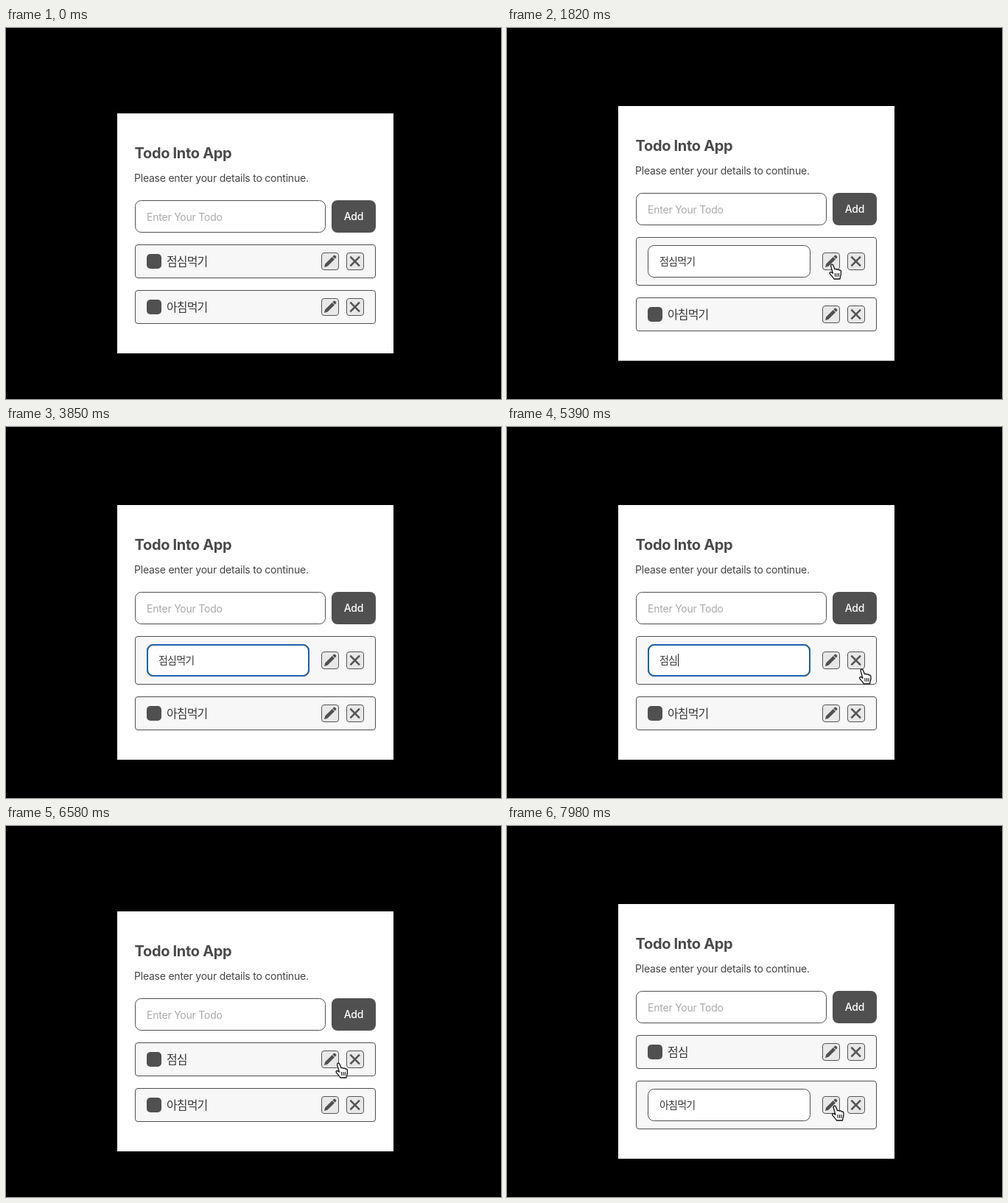
Recreate the animation shown at these times as an HTML page. Size 672x504 px, loop 8000 ms.

```html
<!DOCTYPE html>
<html lang="ko">
<head>
<meta charset="utf-8">
<title>Todo</title>
<style>
  html, body { margin: 0; width: 100%; height: 100%; overflow: hidden; background: #000; }
  svg { display: block; width: 672px; height: 504px; }
  text { font: 14px Inter, "Noto Sans CJK KR", sans-serif; letter-spacing: -.016em; fill: #444; }
  .title { font-size: 20px; font-weight: 700; fill: #4a4a4a; }
  .hint { fill: #a9a9a9; }
  .add { font-weight: 500; fill: #fff; }
  .label, .value { font-family: "Noto Sans CJK KR", "Noto Sans CJK", sans-serif; letter-spacing: -.055em; fill: #39393c; }
  .label { font-size: 16px; }
  .field { fill: #fff; stroke: #4f4f4f; }
  .dark { fill: #505050; }
  .box { fill: #f7f7f7; stroke: #4f4f4f; }
  .button { fill: #e8e8e8; stroke: #555; }
  .cross { fill: none; stroke: #555; stroke-width: 2.6; }
  .ring { fill: none; stroke: #1d60ae; stroke-width: 2; }
  .halo { fill: none; stroke: #fff; stroke-width: 2.6; stroke-linejoin: round; }
  .line { fill: none; stroke: #111; stroke-width: 1.1; }
</style>
</head>
<body>
<svg viewBox="0 0 672 504">
  <defs>
    <g id="icons">
      <rect class="button" x="428.5" y="-11.5" width="23" height="23" rx="3.5"/>
      <path class="dark" transform="translate(440)" d="M-8 8L-6.8 3.6 2.8-6 6-2.8-3.6 6.8ZM3.4-6.6L4.8-8Q6-8.8 6.9-7.9L7.9-6.9Q8.8-6 8-4.8L6.6-3.4Z"/>
      <rect class="button" x="462.5" y="-11.5" width="23" height="23" rx="3.5"/>
      <path class="cross" transform="translate(473.7)" d="M-6.3-6.3L6.3 6.3M6.3-6.3L-6.3 6.3"/>
    </g>
    <path id="beam" d="M-3-8Q0-8 0-6Q0-8 3-8M0-6V6M-3 8Q0 8 0 6Q0 8 3 8M-2 3H2"/>
  </defs>

  <rect width="672" height="504"/>
  <rect id="card" x="151" width="375" fill="#fff"/>
  <g id="head">
    <text class="title" x="174.5" y="177">Todo Into App</text>
    <text x="174" y="209">Please enter your details to continue.</text>
    <rect class="field" x="175.5" y="234.5" width="258" height="43" rx="8"/>
    <text class="hint" x="191" y="262">Enter Your Todo</text>
    <rect class="dark" x="442" y="234" width="60" height="44" rx="8"/>
    <text class="add" x="472" y="261" text-anchor="middle">Add</text>
  </g>
  <g id="rows"></g>

  <g id="cursor">
    <g data-kind="arrow">
      <path d="M0 0V16.6L3.9 13 6.4 18.8 9.2 17.6 6.7 11.9H12Z" stroke="#fff" stroke-width="1.1"/>
    </g>
    <g data-kind="hand" transform="translate(-4.6 -.6)">
      <path d="M3.3 1.8C3.6.4 5.6.2 6.3 1.6L8.6 7.4C9.4 6.6 11 6.8 11.5 7.9C12.4 7.1 14 7.5 14.3 8.8C15.4 8.2 16.9 8.8 17 10.3C17.3 13 17.2 14.8 16.2 17L15.6 20.6H7.6C6.8 18.8 4.2 16.2 2 13.4C.9 12 2.6 10.3 4.4 11.6L6 12.8 3.4 3.4Z" fill="#fff" stroke="#111" stroke-width="1.3" stroke-linejoin="round"/>
      <path class="line" d="M9 12.6L9.3 17.4M11.6 12.6V17.4M14.1 12.6L13.9 17.4"/>
    </g>
    <g data-kind="beam">
      <use href="#beam" class="halo"/>
      <use href="#beam" class="line"/>
    </g>
  </g>
</svg>
<script>
const LOOP = 8000, STEP = 70;
const $ = id => document.getElementById(id);
const show = (el, on) => el.setAttribute('visibility', on ? 'visible' : 'hidden');
const move = (el, x, y) => el.setAttribute('transform', `translate(${x} ${y})`);

// time, x, y, pointer kind from here on
const path = [
  [0, 461, 490, ''], [700, 461, 490, 'arrow'], [840, 462, 440, 'arrow'], [980, 458, 385, 'arrow'],
  [1120, 450, 335, 'arrow'], [1260, 446, 314.5, 'arrow'], [1330, 446, 314.5, 'arrow'],
  [1400, 453, 325, 'hand'], [1470, 462, 335, 'hand'], [1540, 458, 333, 'hand'], [1680, 441, 321, 'hand'],
  [1820, 441, 321, 'hand'], [1960, 406, 320, 'beam'], [2100, 336, 321, 'beam'], [2380, 336, 321, 'beam'],
  [2450, 336, 318, 'beam'], [3360, 336, 318, ''], [5040, 337, 318, 'beam'], [5180, 440, 326, 'hand'],
  [5250, 481.5, 329, 'hand'], [5390, 481.5, 329, 'hand'], [5530, 458, 322, 'hand'], [5600, 451, 322, 'hand'],
  [7000, 451, 322, 'hand'], [7140, 456, 341, 'arrow'], [7280, 463, 372, 'hand'], [7420, 463, 395, 'hand'],
  [7560, 447, 383, 'hand'], [7630, 444.5, 380, 'hand'], [LOOP, 444.5, 380, 'hand']
];

const rows = [0, 1].map(() => {
  const g = document.createElementNS('http://www.w3.org/2000/svg', 'g');
  g.innerHTML = `
    <rect class="box" x="175.5" y=".5" width="326" rx="3.5"/>
    <g class="body">
      <g class="view">
        <rect class="dark" x="191" y="-10" width="20" height="20" rx="5"/>
        <text class="label" x="218" y="6"></text>
      </g>
      <g class="edit">
        <rect class="field" x="191.5" y="-21.5" width="220" height="43" rx="8"/>
        <rect class="ring" x="192" y="-21" width="219" height="42" rx="8"/>
        <text class="value" x="207" y="5"></text>
        <rect class="caret" y="-9" width="1" height="17" fill="#222"/>
      </g>
      <use href="#icons"/>
    </g>`;
  $('rows').append(g);
  const part = name => g.querySelector('.' + name);
  return { g, box: part('box'), body: part('body'), view: part('view'), edit: part('edit'),
    ring: part('ring'), caret: part('caret'), label: part('label'), value: part('value') };
});

function drawRow(row, y, text, editing, focused, caretX) {
  const h = editing ? 66 : 46;
  move(row.g, 0, y);
  row.box.setAttribute('height', h - 1);
  move(row.body, 0, h / 2);
  row.view.style.display = editing ? 'none' : '';
  row.edit.style.display = editing ? '' : 'none';
  row.label.textContent = row.value.textContent = text;
  show(row.ring, focused);
  show(row.caret, caretX > 0);
  row.caret.setAttribute('x', caretX);
  return y + h + 16;
}

function drawCursor(t) {
  t = Math.floor(t / STEP) * STEP;
  const i = path.findIndex(p => p[0] > t);
  const [t0, x0, y0, kind] = path[i - 1], [t1, x1, y1] = path[i];
  const k = (t - t0) / (t1 - t0);
  move($('cursor'), x0 + (x1 - x0) * k, y0 + (y1 - y0) * k);
  for (const el of $('cursor').children) show(el, el.dataset.kind === kind);
}

function draw(t) {
  const editing = t >= 7770 ? 1 : t >= 1820 && t < 6580 ? 0 : -1;
  const shift = editing < 0 ? 0 : 10;
  const focused = t >= 2240 && t < 6440;
  const blink = focused && (t - 2240) % 1050 < 560;
  const caretX = t < 3360 ? 260 : t < 4060 ? 256 : 232;
  const lunch = '점심먹기'.slice(0, t < 4060 ? 4 : t < 4200 ? 3 : 2);

  $('card').setAttribute('y', 116 - shift);
  $('card').setAttribute('height', 326 + 2 * shift);
  move($('head'), 0, -shift);
  const next = drawRow(rows[0], 294 - shift, lunch, editing === 0, focused, blink ? caretX : 0);
  drawRow(rows[1], next, '아침먹기', editing === 1, false, 0);
  drawCursor(t);
}

function tick() {
  draw(performance.now() % LOOP);
  requestAnimationFrame(tick);
}
tick();
</script>
</body>
</html>
```
